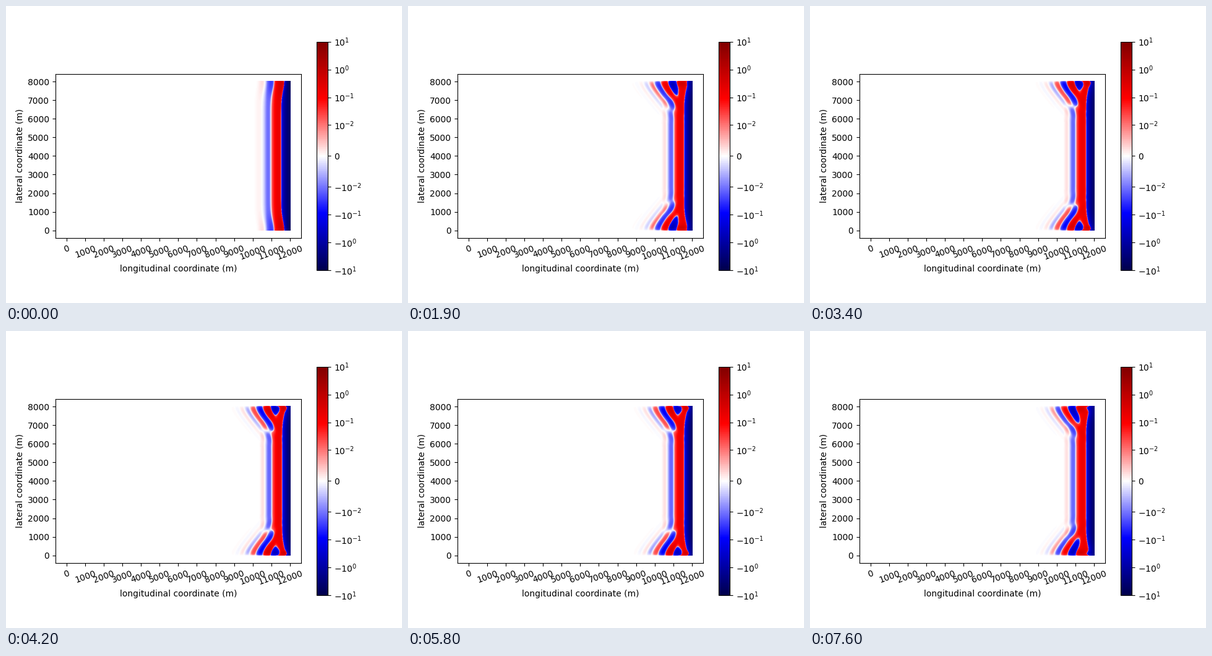
These frames come from a looping animation (640 px wide and 480 px high, 7.7 s). A matplotlib script:

```python
import numpy as np
import matplotlib.pyplot as plt
from matplotlib.animation import FuncAnimation
from matplotlib.cm import ScalarMappable
from matplotlib.colors import SymLogNorm

FRAMES, STEP_MS = 77, 100
ROWS, COLS, FIRST = 480, 720, 520      # only columns from FIRST on carry waves
CYCLES_PER_FRAME = 0.2484              # corner wave frequency
REFERENCE = 34                         # frame at which the corner phase is zero
EDGE = 20                              # the mesh outline overlaps by this many metres

norm = SymLogNorm(linthresh=0.01, vmin=-10, vmax=10, base=10)
seismic = plt.get_cmap("seismic")
field_cmap = plt.get_cmap("seismic", 257)   # odd count: still water is pure white

# Stage pixel coordinates: x across, d = distance from the nearer side wall
x = 98.04 + (np.arange(FIRST, COLS)[None, :] + 0.5) * 0.501
d = (np.arange(ROWS // 2)[:, None] + 0.5) * 0.5011


def bands(start):
    """Standing bands along the right boundary, growing exponentially."""
    t = x - 5 * np.exp(-(d / 22) ** 2) - 428.5 + 1.5 * start
    a, b = 0.0738 - 0.01 * start, 0.0132 - 0.01 * start
    half_waves = np.maximum(2 + a * t / (1 + b * t), 0)
    boost = 1 + 1.5 * start * np.exp(-(d / 18) ** 2)
    return boost * 10 ** (0.075 * t - 1.5) * np.sin(np.pi * half_waves)


# Corner wave: curved crests leave the side walls and fade inwards
p = x - 0.85 * (np.hypot(d, 12) - 12)
turns = (p - 397) / (20 + 0.12 * (p - 397))
reach = 6 + 45 / (1 + np.exp((p - 414) / 7))
height = 10 ** (-0.15 - 0.057 * np.maximum(424 - p, 0))
height = height * np.tanh(d / 4) * np.exp(-(d / reach) ** 2)


def corner_wave(n):
    phase = turns + CYCLES_PER_FRAME * (n - REFERENCE)
    return height * np.cos(2 * np.pi * phase)


def picture(n):
    start = np.exp(-n / 2)
    half = bands(start) + (1 - start) * corner_wave(n)
    field = np.zeros((ROWS, COLS))
    field[:, FIRST:] = np.vstack([half, half[::-1]])
    return field_cmap(norm(field))


fig, ax = plt.subplots(figsize=(6.4, 4.8), dpi=100)
image = ax.imshow(picture(0), extent=(0, 12000 + EDGE, -EDGE, 8000 + EDGE),
                  aspect="equal")
ax.set_xlim(-600, 12600)
ax.set_ylim(-400, 8400)
ax.set_xticks(range(0, 13000, 1000))
ax.set_yticks(range(0, 9000, 1000))
ax.tick_params(axis="x", labelrotation=20)
ax.set_xlabel("longitudinal coordinate (m)")
ax.set_ylabel("lateral coordinate (m)")
powers = [10.0 ** k for k in range(-2, 2)]
bar = fig.colorbar(ScalarMappable(norm, seismic), ax=ax,
                   ticks=[-v for v in powers[::-1]] + [0] + powers)
bar.minorticks_off()


def update(n):
    image.set_data(picture(n))
    return [image]


anim = FuncAnimation(fig, update, frames=FRAMES, interval=STEP_MS,
                     repeat=True, repeat_delay=0)
plt.show()
```
